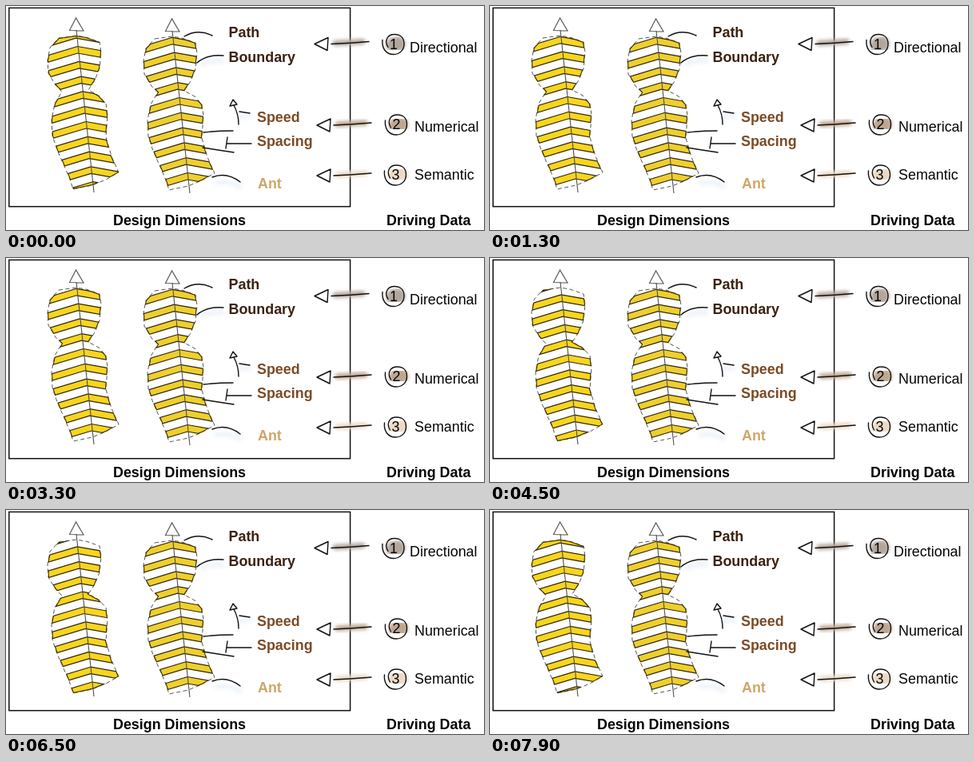
Recreate the animation shown at these times as an HTML page. Size 598 by 280 pixels, loop 8 s.

```html
<!DOCTYPE html>
<html lang="en">
<head>
<meta charset="utf-8">
<title>Design dimensions and driving data</title>
<style>
  html, body { margin: 0; width: 100%; height: 100%; overflow: hidden; background: #fff; }
  svg { display: block; width: 598px; height: 280px; }
  text { font: 17.9px "Liberation Sans", Arial, sans-serif; fill: #050505; }
  .bold text { font-weight: bold; }
  .ink { fill: none; stroke: #111; stroke-width: 1.4; stroke-linecap: round; stroke-linejoin: round; }
  .edge { fill: none; stroke: #555; stroke-width: 1; stroke-dasharray: 5 3.5; }
  .spine { fill: #fff; stroke: #505050; stroke-width: 1.1; }
  .ant { fill: #f8d51d; stroke: #2b260f; stroke-width: 1.2; }
  .still .ant { fill: #efcf2c; }
  .cut { fill: none; stroke: #2b260f; stroke-width: 2; }
  .smear { fill: none; stroke-linecap: round; filter: url(#soft); }
</style>
</head>
<body>
<svg viewBox="0 0 598 280">
  <defs>
    <filter id="soft" x="-50%" y="-150%" width="200%" height="400%"><feGaussianBlur stdDeviation="2"/></filter>
    <path id="body" d="M66 40L88 37L100 39L117 45L119 58L117 78L111 93L103 105L116 112L125 122L127 136L125 164L132 188L141 208L125 217L108 224L84 229L79 214L72 198L64 180L58 162L57 142L61 122L70 107L62 99L53 84L52 68L55 52Z"/>
    <clipPath id="inside"><use href="#body"/></clipPath>
  </defs>

  <rect x="3.8" y="2.4" width="426.8" height="248.3" fill="none" stroke="#111" stroke-width="1.5"/>

  <g class="smear" stroke="#f0f5fb" stroke-width="7">
    <path d="M246 72Q257 67 270 69M292 138L304 138M264 221Q280 218 292 226"/>
  </g>

  <g id="figures"></g>

  <g class="ink">
    <path d="M223 38Q240 28 258 37"/>
    <path d="M239 71C248 63 260 61 272 62"/>
    <path d="M291 148Q291 135 285 124M292 132Q298 133 305 134"/>
    <path d="M284 117L280 125L289 123Z" fill="#fff"/>
    <path d="M247 158Q265 156 284 156M246 177L285 183M277 164L275 178M276 172L307 172"/>
    <path d="M258 214Q276 207 293 220"/>
  </g>

  <g class="bold">
    <text x="278.5" y="39" style="fill:#3c2110">Path</text>
    <text x="278.5" y="70" style="fill:#3c2110">Boundary</text>
    <text x="314" y="145" style="fill:#7c4b25">Speed</text>
    <text x="314" y="175" style="fill:#7c4b25">Spacing</text>
    <text x="315" y="228" style="fill:#cda668">Ant</text>
    <text x="134" y="273.5">Design Dimensions</text>
    <text x="476" y="273.5">Driving Data</text>
  </g>

  <g id="drivers"></g>
</svg>

<script>
  const byId = id => document.getElementById(id);
  const gap = { x: 2.1, y: 18.8 };
  const period = 2000, tick = 100, restPhase = 0.65;

  // Chevron stripes spaced evenly down the spine.
  const stripes = "M84 .7" + `m${gap.x} ${gap.y}l-55 16.5v8.5l55 -16.5l45 8v-8.5z`.repeat(13);

  function figure(x, y, id, kind) {
    const path = `<path d="${stripes}"/>`;
    return `<g class="${kind}" transform="translate(${x} ${y})">
      <clipPath id="${id}">${path}</clipPath>
      <use href="#body" class="edge"/>
      <g clip-path="url(#inside)"><g class="ant">${path}</g>
        <g clip-path="url(#${id})"><use href="#body" class="cut"/></g></g>
      <path class="spine" d="M88 30L110 233M87.5 15L79.5 30.5L97 31Z"/>
    </g>`;
  }

  function driver(n, label, tipX, tipY, cx, cy, textX, textY, color) {
    return `<g class="smear" stroke="${color}">
        <path stroke-width="7" d="M${tipX + 26} ${tipY - 1}L${tipX + 60} ${tipY - 3}"/>
        <path stroke-width="19" d="M${cx} ${cy + 1}l5 -1"/>
      </g>
      <g class="ink">
        <path d="M${tipX} ${tipY}l17 -8l-1 16zM${tipX + 21} ${tipY}q24 -1 47 -3"/>
        <path d="M${cx - 14} ${cy - 5}c-1 10 4 18 14 18c8 0 13 -6 13 -13c0 -8 -5 -12 -12 -12c-9 0 -13 8 -8 16"/>
      </g>
      <text x="${cx}" y="${cy + 6}" text-anchor="middle">${n}</text>
      <text x="${textX}" y="${textY}">${label}</text>`;
  }

  byId("figures").innerHTML =
    figure(0, 0, "cutA", "moving") + figure(120, 1, "cutB", "still");
  byId("drivers").innerHTML =
    driver(1, "Directional", 386, 47.5, 485, 47.5, 505, 57.5, "#b3a69c") +
    driver(2, "Numerical", 389, 149, 488.5, 148, 511, 157, "#bea68f") +
    driver(3, "Semantic", 389, 212, 487.5, 211, 511, 217, "#ecd9c5");

  // The stripes climb one gap per period; the clip moves along with them.
  const moving = document.querySelectorAll(".moving .ant path, #cutA path");

  function draw(now) {
    const phase = Math.floor(now / tick) * tick % period / period;
    const shift = restPhase - phase;
    for (const path of moving)
      path.setAttribute("transform", `translate(${gap.x * shift} ${gap.y * shift})`);
    requestAnimationFrame(draw);
  }
  draw(0);
</script>
</body>
</html>
```
